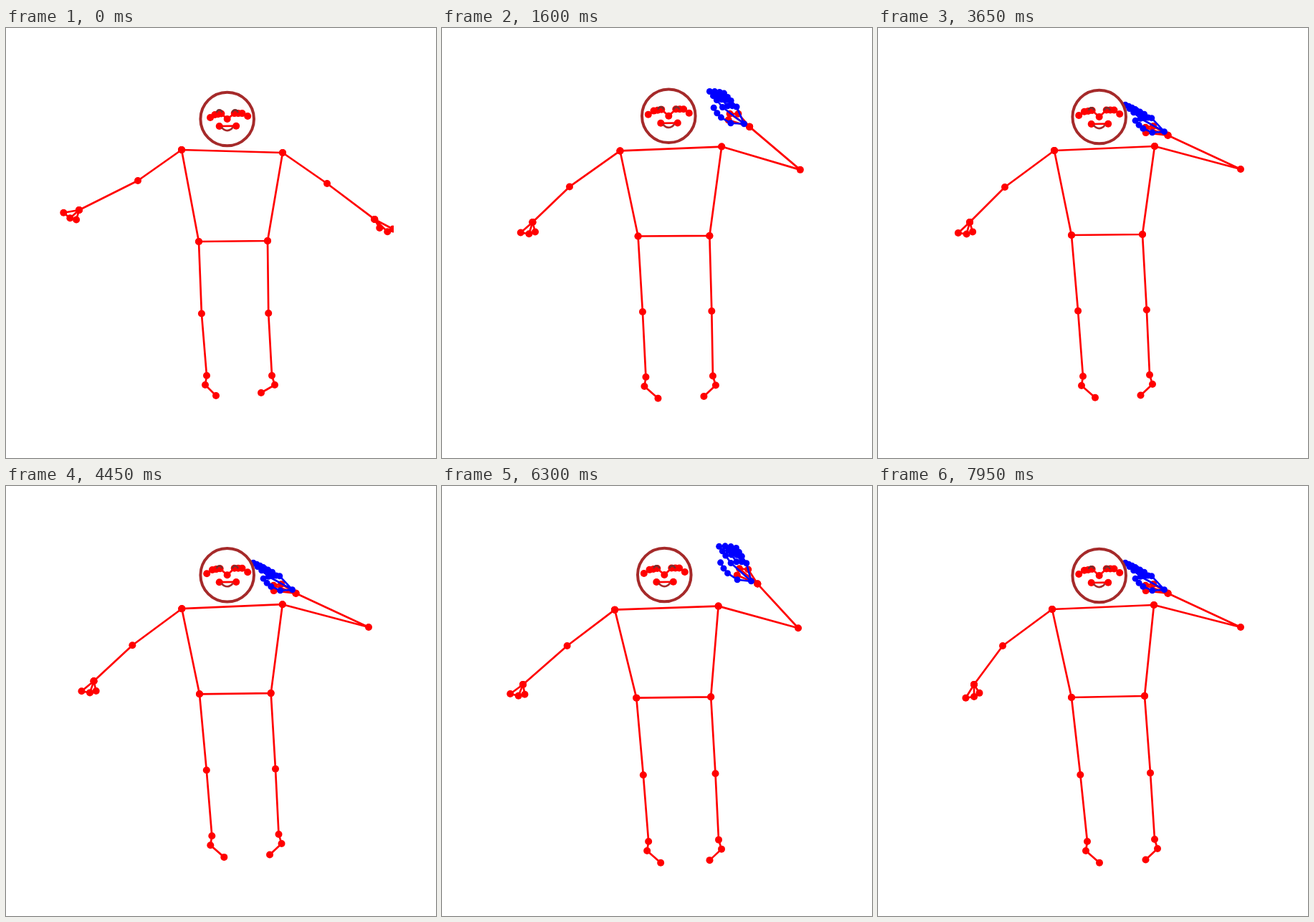
Recreate the animation shown at these times as an HTML page with a canvas. Size 600 px wide and 600 px high, loop 8 s.

```html
<!DOCTYPE html>
<html lang="en">
<head>
<meta charset="utf-8">
<title>Waving figure</title>
<style>
  html, body { margin: 0; width: 100%; height: 100%; overflow: hidden; background: #fff; }
  canvas { display: block; width: 600px; height: 600px; }
</style>
</head>
<body>
<canvas id="stage" width="600" height="600"></canvas>
<script>
const ctx = document.getElementById('stage').getContext('2d');
const LOOP = 8000, STEP = 50;
const RED = '#f00', BLUE = '#00f', BROWN = '#a52a2a', LID = '#7a2e2e';

const lerp = (a, b, u) => a + (b - a) * u;
const clamp01 = v => Math.min(1, Math.max(0, v));
const add = (p, q, k = 1) => [p[0] + q[0] * k, p[1] + q[1] * k];
const mix = (p, q, u) => [lerp(p[0], q[0], u), lerp(p[1], q[1], u)];
// Angles in degrees, counted upwards from the right.
const polar = (degrees, length) => {
  const a = degrees * Math.PI / 180;
  return [Math.cos(a) * length, -Math.sin(a) * length];
};
const heading = (from, to) => Math.atan2(from[1] - to[1], to[0] - from[0]) * 180 / Math.PI;

// Eases from one [time, value] key to the next.
function ease(t, ...keys) {
  const next = keys.findIndex(([time]) => time > t);
  if (next === 0) return keys[0][1];
  if (next < 0) return keys[keys.length - 1][1];
  const [t0, a] = keys[next - 1], [t1, b] = keys[next];
  const u = (t - t0) / (t1 - t0);
  return lerp(a, b, u * u * (3 - 2 * u));
}

function stroke(points, color) {
  ctx.strokeStyle = color;
  ctx.lineWidth = 2.7;
  ctx.beginPath();
  points.forEach(p => ctx.lineTo(...p));
  ctx.stroke();
}
function dots(points, color, radius) {
  ctx.fillStyle = color;
  for (const p of points) {
    ctx.beginPath();
    ctx.arc(...p, radius, 0, 7);
    ctx.fill();
  }
}
function arc(center, radius, from, to, color, width) {
  ctx.strokeStyle = color;
  ctx.lineWidth = width;
  ctx.beginPath();
  ctx.arc(...center, radius, from, to);
  ctx.stroke();
}
function chain(...points) {
  stroke(points, RED);
  dots(points, RED, 5);
}

function leg(hip, ankle, heel, toe, bow) {
  const knee = add(mix(hip, ankle, .537), [bow, 0]);
  chain(hip, knee, ankle, add(ankle, heel), add(ankle, toe));
}

// Little finger, index and thumb fan out around the wrist.
function palm(wrist, angle, spread, lengths) {
  const [little, index, thumb] = lengths.map((length, i) =>
    add(wrist, polar(angle + spread * (i * 16 - 9), length)));
  chain(wrist, little, index, wrist, thumb);
}

function face(center, open) {
  const eye = (side, i) => {
    const narrow = side < 0 ? open : 1;
    const tilt = side < 0 ? i * .9 : -.5;
    return add(center, [side * (10 + i * 5.4) * narrow, (tilt - 9) * open]);
  };
  const ear = side => add(center, [side * 28.5 * (side < 0 ? open : 1), side < 0 ? -2 : -4]);
  chain(ear(-1), eye(-1, 2), eye(-1, 1), eye(-1, 0), center,
    eye(1, 0), eye(1, 1), eye(1, 2), ear(1));
  chain(add(center, [-11, 10]), add(center, [12.5, 9.7]));
}
function smiley(center) {
  arc(center, 37.3, 0, 7, BROWN, 4);
  for (const side of [-11, 11]) arc(add(center, [side, -9]), 3.7, Math.PI, 2 * Math.PI, LID, 2.7);
  arc(add(center, [0, 7]), 9, .5, Math.PI - .5, BROWN, 2.7);
}

// Knuckles and tips lie on two fans; tilting the hand closes both.
function fingers(root, tilt) {
  const middle = 110 + 32 * tilt, gap = 14 - 8 * tilt;
  const knuckles = [], joints = [];
  for (let i = 0; i < 4; i++) {
    const side = 1.5 - i;
    const knuckle = add(root, polar(middle + side * gap, 38 - 4 * i));
    const tip = add(root, polar(middle + 2 + side * (gap - 5), 66 - 5 * i));
    const finger = [0, .45, .72, 1].map(u => mix(knuckle, tip, u));
    stroke(finger, BLUE);
    knuckles.push(knuckle);
    joints.push(...finger);
  }
  stroke([root, ...knuckles, root], BLUE);

  const thumb = [0, .5, .75, 1].map(u => add(root,
    polar(middle + lerp(30, 5, u) + gap * 2, lerp(21, 54, u) * (1 - .2 * tilt))));
  stroke([root, ...thumb], BLUE);
  dots([root, ...joints, ...thumb], BLUE, 4.5);
}

function draw(t) {
  ctx.fillStyle = '#fff';
  ctx.fillRect(0, 0, 600, 600);
  ctx.save();
  ctx.beginPath();
  ctx.rect(75, 72, 466, 462);
  ctx.clip();
  ctx.lineJoin = 'round';

  // The arm lifts once, then the forearm swings between head and open air.
  const bend = ease(t, [0, -37], [750, 155], [1100, 155], [2250, 117],
    [3650, 155], [4550, 155], [5750, 117], [7000, 155]);
  const raised = clamp01((bend + 37) / 157);
  const tilt = Math.max(0, (bend - 120) / 35);

  // Whole-body moves: settling from the first stance, leaning, stepping closer.
  const settle = ease(t, [0, 0], [750, 1]);
  const lean = ease(t, [0, 0], [750, 1], [2550, 0]);
  const near = ease(t, [3650, 0], [6300, 1]);
  const away = settle * clamp01(1 - tilt);
  const joint = (start, rest, swing, leaning, step) =>
    add(add(add(mix(start, rest, settle), swing, away), leaning, lean), step, near);

  const head = joint([308.7, 127], [308.7, 124], [2.5, -1.5], [12, -1], [0, 1]);
  const shoulderL = joint([245, 170], [246, 171], [-3, 1], [7, 0], [-3, 1]);
  const shoulderR = joint([386, 174], [386, 165], [1, 2.5], [7, -1], [-1, 1]);
  const hipL = joint([269, 298], [270, 289], [2, 1], [5, 2], [0, 6]);
  const hipR = joint([365, 297], [369, 288], [5, 2], [4, 2], [3, 5]);
  const ankleL = joint([280, 485], [286, 486], [-6, 0], [2, 2], [6, 10]);
  const ankleR = joint([371, 485], [379, 484], [0, 1], [-2, 2], [7, 9]);

  face(head, lerp(.83, 1, settle));
  chain(shoulderL, shoulderR, hipR, hipL, shoulderL);
  const bow = 2.5 * settle - 2;
  leg(hipL, ankleL, [-2, 13], mix([13, 28], [17, 29.7], settle), bow);
  leg(hipR, ankleR, [4, 13], mix([-15, 24], [-12.5, 28.5], settle), bow);

  const elbowL = joint([184, 213], [177, 222], [1, 0], [1, -1], [-3, 1]);
  const wristL = [
    ease(t, [0, 102], [750, 126], [3650, 128], [5600, 113], [6300, 113], [7950, 134]),
    lerp(254, 271, settle) + 6 * near];
  const drop = heading(elbowL, wristL);
  chain(shoulderL, elbowL, wristL);
  palm(wristL, 1.8 * (drop + 135) - 119, 2, [22, 17, 14]);

  const elbowR = add(mix([448, 217], [492, 199], raised), [14, -2], tilt);
  const wristR = add(elbowR, polar(bend, lerp(83, 68, raised) + 44 * tilt));
  chain(shoulderR, elbowR, wristR);
  palm(wristR, bend, lerp(-1, 1.2 - .4 * tilt, raised),
    [lerp(29, 24, raised), lerp(25, 33, raised), lerp(14, 31, raised)]);
  if (bend > 100) fingers(add(wristR, mix([-11, -3], [-5, -5], tilt)), tilt);

  smiley(head);
  ctx.restore();
}

function tick() {
  const t = performance.now() % LOOP;
  draw(Math.floor(t / STEP) * STEP);
  requestAnimationFrame(tick);
}
tick();
</script>
</body>
</html>
```
